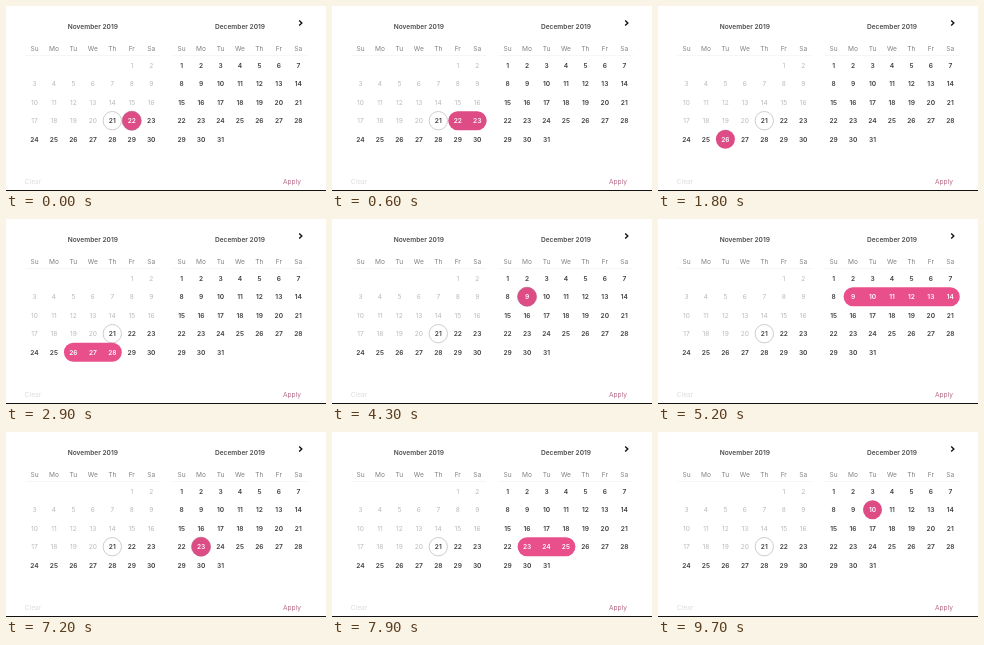
Write an HTML page that moves like this. It is 320x185 px and loops after 9900 ms.

```html
<!DOCTYPE html>
<html lang="en">
<head>
<meta charset="utf-8">
<style>
html, body { margin: 0; width: 100%; height: 100%; overflow: hidden; background: #fff; }
svg { display: block; width: 320px; height: 185px; }
text { font: 6.6px Inter, sans-serif; text-anchor: middle; fill: #808080; }
.title { font-weight: 600; fill: #4c4c4c; }
.bold { font-weight: 600; fill: #3e3e3e; }
.past { fill: #b9b9b9; }
.on { font-weight: 600; fill: #fff; }
</style>
</head>
<body>
<svg id="stage" viewBox="0 0 320 185"></svg>
<script>
const LOOP = 9900, STEP_X = 19.45, STEP_Y = 18.5, R = 9.5;
const PINK = '#dd4c85', RANGE_PINK = '#e84f8b', RING = '#bd5a86';
const stage = document.getElementById('stage');

function add(tag, attrs, content = '') {
  const el = document.createElementNS('http://www.w3.org/2000/svg', tag);
  for (const key in attrs) el.setAttribute(key, attrs[key]);
  el.textContent = content;
  return stage.appendChild(el);
}

// y is the middle of the capitals
const label = (x, y, content, cls = '') => add('text', { x, y: y + 2.4, class: cls }, content);

const months = [
  { name: 'November 2019', x: 28.5, titleX: 86.8, first: 5, days: 30, past: 20 },
  { name: 'December 2019', x: 175.6, titleX: 234, first: 0, days: 31, past: 0 }
];

function place(month, day) {
  const cell = month.first + day - 1;
  return { x: month.x + cell % 7 * STEP_X, y: 59.2 + Math.floor(cell / 7) * STEP_Y };
}

add('rect', { y: 184, width: 320, height: 1, fill: '#111' });
add('path', { d: 'M293.2 14.4l2.6 2.5-2.6 2.5', fill: 'none', stroke: '#111', 'stroke-width': 1.4 });

const today = place(months[0], 21);
add('circle', { cx: today.x, cy: today.y, r: 9.2, fill: 'none', stroke: '#c0c0c0', 'stroke-width': 0.8 });
const pill = add('rect', { height: 2 * R, rx: R, 'stroke-width': 0.7 });

for (const month of months) {
  label(month.titleX, 20.6, month.name, 'title');
  add('path', { d: `M${month.x - 9} 49.5h${6 * STEP_X + 18}`, stroke: '#f3f3f3', 'stroke-width': 0.7 });
  ['Su', 'Mo', 'Tu', 'We', 'Th', 'Fr', 'Sa'].forEach((name, i) => label(month.x + i * STEP_X, 42.6, name));
  month.cells = [];
  for (let day = 1; day <= month.days; day++) {
    const { x, y } = place(month, day);
    const cls = day <= month.past ? 'past' : 'bold';
    month.cells[day] = { cls, el: label(x, y, day, cls) };
  }
}

label(27, 175.8, 'Clear').style.fill = '#dcdcdc';
label(286, 175.8, 'Apply').style.fill = '#b56a87';

// start time, month index, first day, last day, fill, outline while hovered
const picks = [
  [0, 0, 22, 22, PINK, RING],
  [100, 0, 22, 22, PINK],
  [600, 0, 22, 23, PINK],
  [1800, 0, 26, 26, PINK],
  [2900, 0, 26, 28, RANGE_PINK],
  [4300, 1, 9, 9, PINK, RING],
  [5200, 1, 9, 14, RANGE_PINK],
  [7200, 1, 23, 23, PINK, RING],
  [7900, 1, 23, 25, RANGE_PINK],
  [9700, 1, 10, 10, PINK]
];

let shown;
function show(pick) {
  const [, index, from, to, fill, outline = 'none'] = pick;
  const { x, y } = place(months[index], from);
  const width = 2 * R + (to - from) * STEP_X;
  const box = { x: x - R, y: y - R, width, fill, stroke: outline };
  for (const key in box) pill.setAttribute(key, box[key]);
  months.forEach((month, i) => month.cells.forEach(({ el, cls }, day) =>
    el.setAttribute('class', i === index && day >= from && day <= to ? 'on' : cls)));
}

const start = performance.now();
function tick() {
  const t = (performance.now() - start) % LOOP;
  const pick = picks.filter(p => p[0] <= t).pop();
  if (pick !== shown) show(shown = pick);
  requestAnimationFrame(tick);
}
tick();
</script>
</body>
</html>
```
